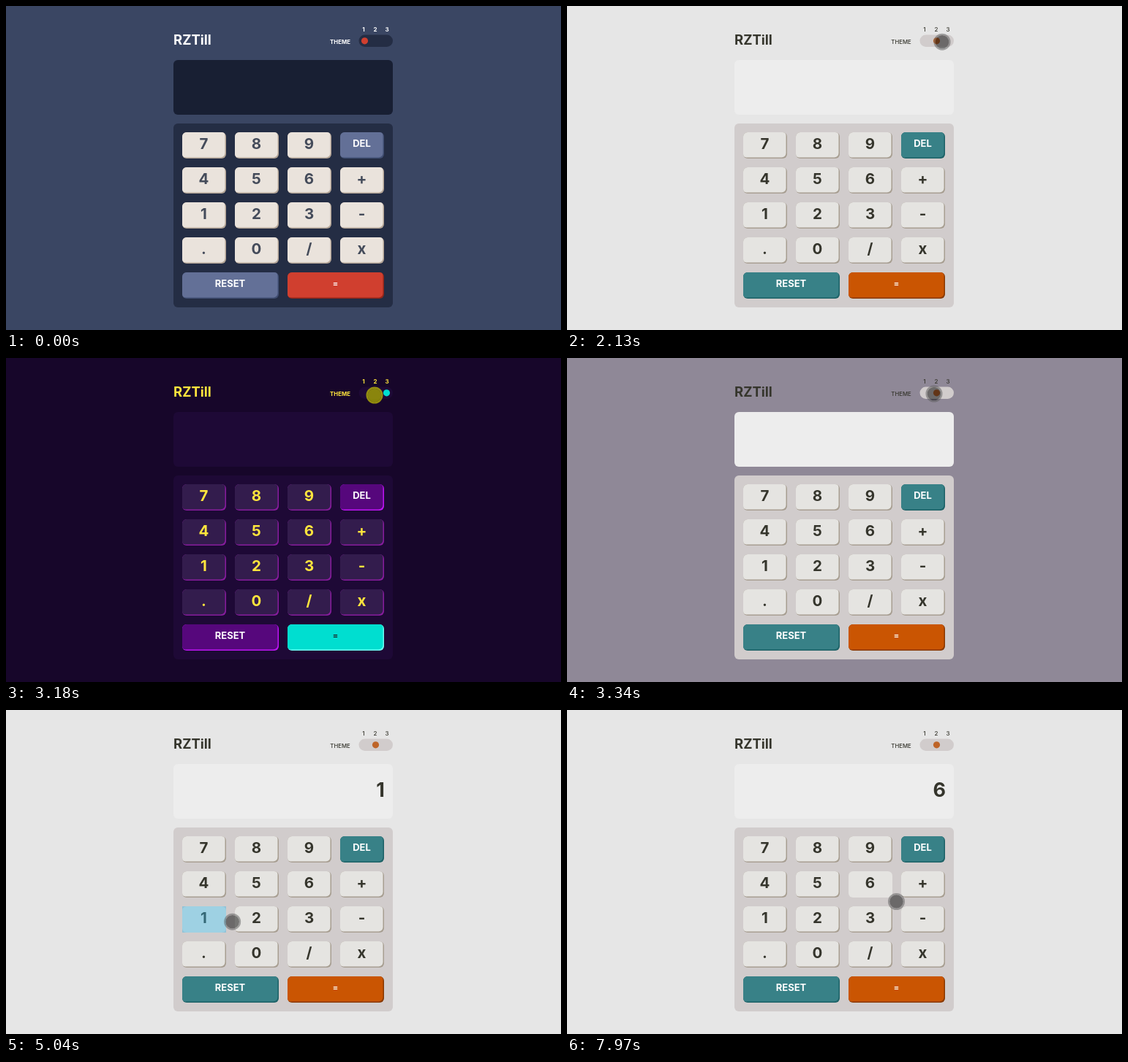
Write an HTML page with a canvas that moves like this. It is 759 by 444 pixels and loops after 8000 ms.

```html
<!DOCTYPE html>
<html lang="en">
<head>
<meta charset="utf-8">
<title>Calculator</title>
<style>
html, body { margin: 0; width: 100%; height: 100%; overflow: hidden; background: #3a4663; }
canvas { display: block; width: 759px; height: 444px; }
</style>
</head>
<body>
<canvas id="stage" width="759" height="444"></canvas>
<script>
const ctx = document.getElementById('stage').getContext('2d');
const LOOP = 8000, CLICK = 78, FADE = 250;
const FONT = 'Inter, "Open Sans", sans-serif';

const THEMES = [
  { bg: [58, 70, 99], title: '#ffffff', pad: '#242d44', screen: '#181f33', dot: '#d03f2f',
    key: '#eae3dc', keyEdge: '#b4a597', text: '#444b5a',
    fn: '#637097', fnEdge: '#404e72', eq: '#d03f2f', eqEdge: '#93261a', eqText: '#ffffff', small: 700 },
  { bg: [230, 230, 230], title: '#35352c', pad: '#d1cccc', screen: '#ededed', dot: '#be6428',
    key: '#e5e4e1', keyEdge: '#a79e91', text: '#35352c',
    fn: '#388187', fnEdge: '#1c6166', eq: '#ca5502', eqEdge: '#893901', eqText: '#ffffff', small: 500 },
  { bg: [23, 6, 42], title: '#ffe53d', pad: '#1e0936', screen: '#1e0936', dot: '#00ded0',
    key: '#331c4d', keyEdge: '#881c9e', text: '#ffe53d',
    fn: '#56077c', fnEdge: '#be15f4', eq: '#00ded0', eqEdge: '#6cf9f1', eqText: '#1a2327', small: 700 }
];

const SWITCHES = [[1577, 1], [2347, 2], [3257, 1]];

const TAPS = [
  { at: 4780, key: '1', shows: '1' },
  { at: 5540, key: '0', shows: '10' },
  { at: 6580, key: '+', shows: '10' },
  { at: 7120, key: '6', shows: '6' }
];
const PRESSES = [1500, 2270, 3180, ...TAPS.map(tap => tap.at)];

const sine = Math.sin, PI = Math.PI;
const smooth = p => p * p * (3 - 2 * p);
const slowEnd = p => sine(p * PI / 2);
const slowStart = p => 1 - Math.cos(p * PI / 2);
const linear = p => p;

// time, x, y, easing of the move that ends here
const PATH = [
  [70, 722, 457], [820, 489, 58, smooth], [900, 499, 55, smooth],
  [1150, 501.5, 53, smooth], [1300, 501.5, 53], [1480, 504, 48, smooth],
  [2000, 504, 48], [2230, 519, 50, smooth], [2470, 517, 51, smooth], [2560, 517, 51],
  [2830, 502.5, 50, smooth], [2960, 504, 51, smooth], [3190, 504, 51],
  [3340, 502, 49, smooth], [3890, 502, 49], [4650, 294.5, 281, smooth],
  [4880, 294.5, 281], [5040, 309.5, 290, slowStart], [5360, 341.5, 328.5, slowEnd],
  [5680, 341.5, 328.5], [6350, 482.5, 237.5, smooth], [6660, 482.5, 237.5],
  [6920, 429.5, 235.5, smooth], [7870, 429.5, 235.5], [7970, 450.5, 262.5, slowStart],
  [8000, 450.5, 262.5]
];

const KEYS = [];
['7', '8', '9', 'DEL', '4', '5', '6', '+', '1', '2', '3', '-', '.', '0', '/', 'x']
  .forEach((label, i) => KEYS.push({ label, x: 241 + i % 4 * 72, y: 173 + (i >> 2) * 48, w: 60 }));
KEYS.push({ label: 'RESET', x: 241, y: 365, w: 132 }, { label: '=', x: 385, y: 365, w: 132 });

// CSS "ease", cubic-bezier(.25, .1, .25, 1)
function ease(p) {
  if (p <= 0) return 0;
  if (p >= 1) return 1;
  const curve = (a, b, u) => 3 * a * u * (1 - u) ** 2 + 3 * b * u * u * (1 - u) + u ** 3;
  let lo = 0, hi = 1;
  for (let i = 0; i < 24; i++) {
    const mid = (lo + hi) / 2;
    if (curve(.25, .25, mid) < p) lo = mid; else hi = mid;
  }
  return curve(.1, 1, lo);
}

function box(x, y, w, h, r, fill) {
  ctx.fillStyle = fill;
  ctx.beginPath();
  ctx.roundRect(x, y, w, h, r);
  ctx.fill();
}

function disc(x, y, r, fill) {
  ctx.fillStyle = fill;
  ctx.beginPath();
  ctx.arc(x, y, r, 0, 2 * PI);
  ctx.fill();
}

function write(str, x, y, size, fill, align = 'center', weight = 700) {
  ctx.font = `${weight} ${size}px ${FONT}`;
  ctx.textAlign = align;
  ctx.fillStyle = fill;
  ctx.fillText(str, x, y);
}

function themeAt(t) {
  let now = 0, bg = THEMES[0].bg;
  for (const [at, next] of SWITCHES) {
    if (t < at) break;
    const p = ease((t - at) / FADE), from = THEMES[now].bg, to = THEMES[next].bg;
    bg = from.map((v, i) => Math.round(v + (to[i] - v) * p));
    now = next;
  }
  return { now, bg };
}

function cursorAt(t) {
  const i = PATH.findIndex(point => point[0] > t);
  if (i < 1) return null;
  const [t0, x0, y0] = PATH[i - 1], [t1, x1, y1, move = linear] = PATH[i];
  const p = move((t - t0) / (t1 - t0));
  return [x0 + (x1 - x0) * p, y0 + (y1 - y0) * p];
}

function drawKey(key, c, focused, lit) {
  const { label, x, y, w } = key, h = 36, mid = x + w / 2 - .5;
  const kind = label === '=' ? 'eq' : label.length > 1 ? 'fn' : 'key';
  box(x, y, w, h, 6, focused ? c[kind] : c[kind + 'Edge']);
  if (!focused) {
    ctx.save();
    ctx.clip();
    box(x - 1.5, y - 1.5, w, h, 6, c[kind]);
    ctx.restore();
  }
  if (kind === 'key') write(label, mid, y + 23, 20.5, c.text);
  else if (kind === 'fn') write(label, mid, y + 20, 13, '#ffffff');
  else write(label, mid, y + 19, 11, c.eqText);
  if (lit) {
    ctx.fillStyle = 'rgba(51,181,229,.4)';
    ctx.fillRect(x, y, w, h);
  }
}

function drawCursor(t) {
  const spot = cursorAt(t);
  if (!spot) return;
  const down = PRESSES.some(at => t >= at && t < at + CLICK);
  const [x, y] = spot;
  disc(x, y, 9.3, down ? 'rgba(175,175,0,.75)' : 'rgba(5,5,5,.5)');
  ctx.strokeStyle = down ? 'rgba(208,208,0,.68)' : 'rgba(90,90,90,.5)';
  ctx.lineWidth = 2.2;
  ctx.beginPath();
  ctx.arc(x, y, 10.4, 0, 2 * PI);
  ctx.stroke();
}

function draw(t) {
  const { now, bg } = themeAt(t), c = THEMES[now];
  ctx.fillStyle = `rgb(${bg})`;
  ctx.fillRect(0, 0, 759, 444);

  write('RZTill', 229, 53, 18.5, c.title, 'left');
  write('THEME', 457, 52, 7.8, c.title, 'center', c.small);
  for (let i = 0; i < 3; i++) write(i + 1, 489 + i * 16, 35, 8, c.title, 'center', c.small);
  box(482.5, 39.5, 46.5, 16.5, 8.25, c.pad);
  disc(490.5 + now * 15, 47.8, 4.6, c.dot);

  box(229, 74, 300, 75, 6, c.screen);
  box(229, 161, 300, 252, 6, c.pad);

  const last = TAPS.filter(tap => t >= tap.at + CLICK).pop();
  if (last) write(last.shows, 518, 119, 27, c.text, 'right');
  for (const key of KEYS) {
    const focused = !!last && last.key === key.label;
    drawKey(key, c, focused, focused && t < last.at + 290);
  }
  drawCursor(t);
}

const start = performance.now();
function tick() {
  draw((performance.now() - start) % LOOP);
  requestAnimationFrame(tick);
}
tick();
</script>
</body>
</html>
```
